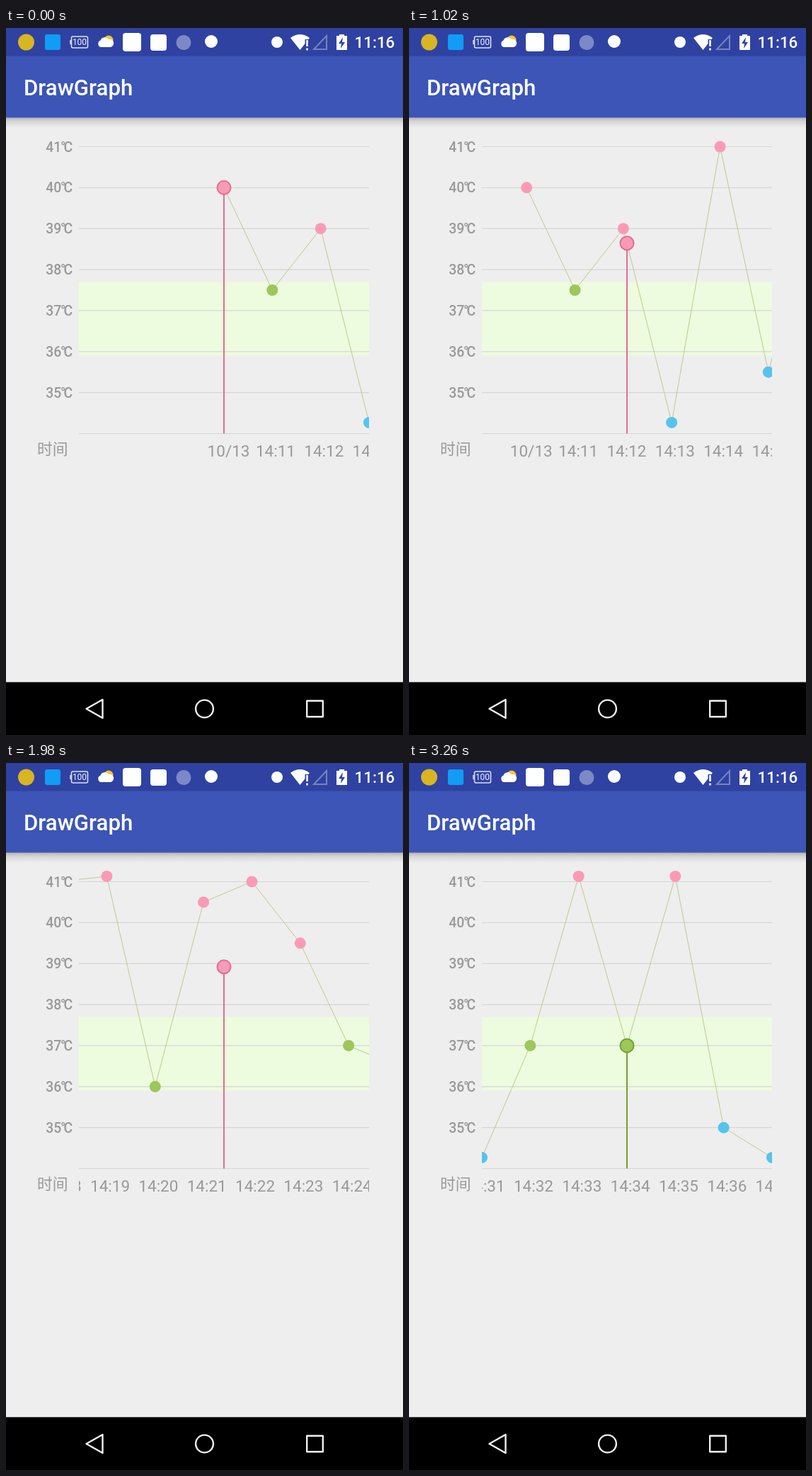
Write an HTML page that moves like this. It is 561x998 px and loops after 3.28 s.

```html
<!DOCTYPE html>
<html lang="zh">
<head>
<meta charset="utf-8">
<title>DrawGraph</title>
<style>
html, body { margin: 0; width: 100%; height: 100%; overflow: hidden; background: #eee; }
svg { display: block; width: 100vw; height: 100vh; font-family: Roboto, "Noto Sans CJK SC", "Noto Sans CJK", sans-serif; }
.med { font-weight: 500; fill: #fff; }
.grey { fill: #999; }
.nav { fill: none; stroke: #f0f0f0; stroke-width: 2.4; stroke-linejoin: round; }
</style>
</head>
<body>
<svg id="stage" viewBox="0 0 561 998" xmlns="http://www.w3.org/2000/svg">
  <defs>
    <clipPath id="plot"><rect x="103" y="130" width="410" height="490"/></clipPath>
    <linearGradient id="shade" x1="0" y1="0" x2="0" y2="1">
      <stop offset="0" stop-color="#000" stop-opacity=".25"/>
      <stop offset=".4" stop-color="#000" stop-opacity=".1"/>
      <stop offset="1" stop-color="#000" stop-opacity="0"/>
    </linearGradient>
  </defs>
  <rect width="561" height="998" fill="#eee"/>
  <rect y="126" width="561" height="15" fill="url(#shade)"/>
  <rect width="561" height="126.5" fill="#3c55b6"/>
  <rect width="561" height="39.5" fill="#2f42a1"/>
  <text class="med" x="24.9" y="94.7" font-size="31.2">DrawGraph</text>

  <!-- status bar -->
  <circle cx="28.5" cy="20" r="11.5" fill="#d9b521"/>
  <rect x="55" y="9" width="22" height="22" rx="3" fill="#119cf5"/>
  <g fill="none" stroke="#dfe3f3" stroke-width="1.5">
    <rect x="92.5" y="12" width="23" height="16" rx="2"/>
    <path d="M91 17v6"/>
  </g>
  <text x="104" y="24.3" font-size="12" text-anchor="middle" fill="#eef0fa">100</text>
  <circle cx="145" cy="17" r="6.5" fill="#fbc52d"/>
  <path d="M134 27a5 5 0 0 1-.5-9.5a6.5 6.5 0 0 1 11.5-1.5a5.6 5.6 0 0 1 3 11z" fill="#fff"/>
  <rect x="165" y="7" width="26" height="26" rx="4" fill="#fff"/>
  <rect x="204" y="9" width="23" height="23" rx="4" fill="#fff"/>
  <circle cx="251" cy="20.5" r="10.5" fill="#7d89c6"/>
  <circle cx="290" cy="19" r="9" fill="#fff"/>
  <circle cx="383" cy="20" r="8" fill="#fff"/>
  <path d="M402 14q13.5-10 27 0l-13.5 17z" fill="#fff"/>
  <path d="M425.5 16v16" stroke="#2f42a1" stroke-width="6"/>
  <path d="M425.5 17v9m0 2.500v3" stroke="#fff" stroke-width="2.5"/>
  <path d="M453 11v19h-18z" fill="none" stroke="#7783c2" stroke-width="2"/>
  <path d="M471 9h7v2h4v20h-15v-20h4z" fill="#fff"/>
  <path d="M476 13l-6 9h4l-1 7l6-9h-4z" fill="#2f42a1"/>
  <text class="med" x="492.5" y="28" font-size="22.4">11:16</text>

  <!-- chart -->
  <rect x="103" y="358.4" width="410" height="104.2" fill="#edfbdf"/>
  <g id="grid"></g>
  <text class="grey" x="44" y="602" font-size="21.8">时间</text>
  <g clip-path="url(#plot)">
    <path id="trend" fill="none" stroke="#b9c67f" stroke-width=".9"/>
    <path id="stem" stroke-width="2"/>
    <circle id="marker" cx="308" r="9.5" stroke-width="2"/>
    <g id="dots"></g>
  </g>

  <!-- navigation bar -->
  <rect y="923.4" width="561" height="74.6" fill="#000"/>
  <path class="nav" d="M113.500 961l23-13v26z"/>
  <circle class="nav" cx="280.5" cy="961" r="12.4"/>
  <rect class="nav" x="425.2" y="949.7" width="22.6" height="22.6"/>
</svg>
<script>
const LOOP = 3280, TICK = 20, STEP = 410 / 6, MID = 308, BASE = 572.5, DEGREE = 405 / 7;
const temps = [40, 37.5, 39, 34.27, 41, 35.5, 40, 37, 41, 41.13, 36, 40.5, 41, 39.5,
  37, 36.5, 39, 35.5, 38.5, 36, 41, 34.27, 37, 41.13, 37, 41.13, 35, 34.27];
const HOT = { fill: "#f99bb7", edge: "#e26d92" };
const FINE = { fill: "#9dc65b", edge: "#739f32" };
const COLD = { fill: "#56c3ee", edge: "#2c94c6" };

const byId = id => document.getElementById(id);
const yOf = temp => BASE - (temp - 34) * DEGREE;
const tone = temp => temp > 37.7 ? HOT : temp < 35.9 ? COLD : FINE;

function set(node, attrs) {
  for (const name in attrs) node.setAttribute(name, attrs[name]);
  return node;
}
function add(parent, tag, attrs, text = "") {
  const node = document.createElementNS("http://www.w3.org/2000/svg", tag);
  node.textContent = text;
  return parent.appendChild(set(node, attrs));
}

const grid = byId("grid"), dots = byId("dots"), trend = byId("trend");
const stem = byId("stem"), marker = byId("marker");

for (let deg = 34; deg <= 41; deg++) {
  const y = yOf(deg);
  add(grid, "path", { d: `M103 ${y}H513`, stroke: "#d5d7d3", "stroke-width": 1.2 });
  if (deg === 34) continue;
  const label = { y: y + 7, "font-size": 19.4, "font-weight": 500, class: "grey" };
  add(grid, "text", { ...label, x: 56.3 }, deg);
  add(grid, "text", { ...label, x: 77, "letter-spacing": -2.9 }, "°C");
}
temps.forEach((temp, i) => {
  add(dots, "circle", { cx: i * STEP, cy: yOf(temp), r: 8, fill: tone(temp).fill });
  add(dots, "text", { x: i * STEP - 23.4, y: 604.6, "font-size": 22.5, class: "grey" },
    i ? "14:" + (10 + i) : "10/13");
});
trend.setAttribute("d", "M" + temps.map((temp, i) => `${i * STEP} ${yOf(temp)}`).join("L"));

// Finger drag: time, position in samples, speed per ms
const drag = [[0, 0, 0], [400, 3.018, 0], [430, 3.018, 0], [1020, 2.075, -.0022],
  [1500, .776, -.0018], [1650, .55, 0], [1800, 3.227, .0537]];
const RELEASE = 1800, FLING_END = 3065, TARGET = 24;

function scrollAt(t) {
  if (t >= FLING_END) return TARGET;
  if (t >= RELEASE) return TARGET - 20.773 * ((FLING_END - t) / (FLING_END - RELEASE)) ** 3.269;
  const k = drag.findIndex(key => key[0] > t);
  const [t0, p0, v0] = drag[k - 1], [t1, p1, v1] = drag[k];
  const span = t1 - t0, u = (t - t0) / span, w = 1 - u;
  return w * w * ((1 + 2 * u) * p0 + u * span * v0) + u * u * ((1 + 2 * w) * p1 - w * span * v1);
}
function tempAt(pos) {
  const i = Math.min(Math.floor(pos), temps.length - 2);
  return temps[i] + (temps[i + 1] - temps[i]) * (pos - i);
}

function render(t) {
  const shift = `translate(${MID - scrollAt(t) * STEP} 0)`;
  set(trend, { transform: shift });
  set(dots, { transform: shift });
  // The marker follows the finger at once but trails the fling by one tick
  const pos = scrollAt(t > RELEASE ? t - TICK : t), y = yOf(tempAt(pos));
  const { fill, edge } = tone(temps[Math.round(pos)]);
  set(stem, { d: `M${MID} ${y}V${BASE}`, stroke: edge });
  set(marker, { cy: y, fill, stroke: edge });
}

const start = performance.now();
function frame() {
  const t = Math.max(0, performance.now() - start) % LOOP;
  render(Math.floor(t / TICK) * TICK);
  requestAnimationFrame(frame);
}
frame();
</script>
</body>
</html>
```
